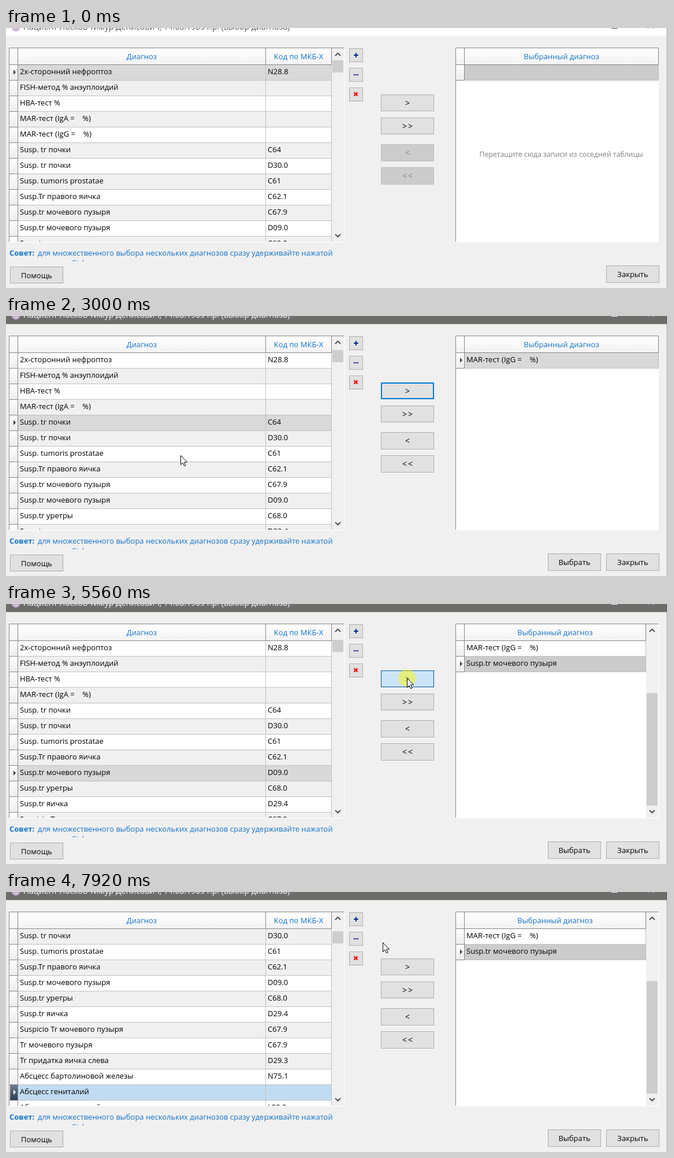
An HTML page with a canvas for the animation above (8 s loop, 1146 by 450 pixels).

```html
<!DOCTYPE html>
<html lang="ru">
<head>
<meta charset="utf-8">
<style>
html, body { margin: 0; width: 100%; height: 100%; overflow: hidden; background: #f0f0f0; }
canvas { display: block; }
</style>
</head>
<body>
<canvas id="stage" width="1146" height="450"></canvas>
<script>
const g = document.getElementById('stage').getContext('2d');
const LOOP = 8000, ROW = 27, TOP = 64;
const BLUE = '#1472c8', LINE = '#c0c0c0', EDGE = '#868686';

const diagnoses = [
  '2x-сторонний нефроптоз|N28.8', 'FISH-метод % анэуплоидий|', 'HBA-тест %|',
  'MAR-тест (IgA =    %)|', 'MAR-тест (IgG =    %)|', 'Susp. tr почки|C64',
  'Susp. tr почки|D30.0', 'Susp. tumoris prostatae|C61', 'Susp.Tr правого яичка|C62.1',
  'Susp.tr мочевого пузыря|C67.9', 'Susp.tr мочевого пузыря|D09.0', 'Susp.tr уретры|C68.0',
  'Susp.tr яичка|D29.4', 'Suspicio Tr мочевого пузыря|C67.9', 'Tr мочевого пузыря|C67.9',
  'Tr придатка яичка слева|D29.3', 'Абсцесс бартолиновой железы|N75.1',
  'Абсцесс гениталий|', 'Абсцесс мошоночный|L08.9'
].map(s => s.split('|'));

// time, x, y of the pointer tip
const path = [
  [360, 560, 452], [840, 416, 171], [1340, 416, 171], [1880, 688, 129], [2120, 688, 129],
  [2840, 312, 235], [2920, 312, 235], [3360, 203, 299], [3840, 203, 299], [4520, 700, 130],
  [4640, 700, 144], [4760, 700, 160], [4880, 698, 146], [5160, 694, 128], [5580, 694, 128],
  [6200, 364, 180], [6360, 364, 180], [7160, 131, 331], [7240, 131, 331], [7360, 127, 348],
  [7540, 127, 348], [7920, 652, 87]
];
const clicks = [[1000, 1200], [1960, 2080], [3720, 3880], [5520, 5600], [7520, 7640]];
const hovers = {
  '>': [[1800, 2300], [4400, 4640], [4920, 5680]],
  '>>': [[4640, 4860]]
};

const clamp = v => Math.max(0, Math.min(1, v));
const within = (t, spans) => spans.some(([a, b]) => t >= a && t < b);

function pointer(t) {
  const i = path.findIndex(p => p[0] > t);
  if (i < 0) return path[path.length - 1].slice(1);
  if (i === 0) return [560, 470];
  const [t0, x0, y0] = path[i - 1], [t1, x1, y1] = path[i];
  const u = (t - t0) / (t1 - t0), e = u * u * (3 - 2 * u);
  return [Math.round(x0 + (x1 - x0) * e), Math.round(y0 + (y1 - y0) * e)];
}

function glow(t, spans = []) {
  return Math.max(0, ...spans.map(([a, b]) =>
    t < b ? clamp((t - a) / 240) : clamp((b - a) / 240) * clamp(1 - (t - b) / 300)));
}

function mix(a, b, k) {
  return `rgb(${a.map((v, i) => Math.round(v + (b[i] - v) * k))})`;
}

function rect(x, y, w, h, color) {
  g.fillStyle = color;
  g.fillRect(x, y, w, h);
}

function shade(x, y, w, h, from, to) {
  const fill = g.createLinearGradient(0, y, 0, y + h);
  fill.addColorStop(0, from);
  fill.addColorStop(1, to);
  rect(x, y, w, h, fill);
}

function text(s, x, y, color = '#000', align = 'left', size = 13, weight = 400) {
  g.font = `${weight} ${size}px "Open Sans", "Noto Sans", sans-serif`;
  g.textAlign = align;
  g.fillStyle = color;
  g.fillText(s, x, y);
}

function poly(points, color) {
  g.beginPath();
  points.forEach(([x, y]) => g.lineTo(x, y));
  g.closePath();
  g.fillStyle = color;
  g.fill();
}

function stroke(points, color, width) {
  g.beginPath();
  points.forEach(([x, y]) => g.lineTo(x, y));
  g.strokeStyle = color;
  g.lineWidth = width;
  g.stroke();
}

function box(x, y, w, h, fill, border, line = 1) {
  rect(x, y, w, h, border);
  rect(x + line, y + line, w - 2 * line, h - 2 * line, fill);
}

function button(label, x, y, h = 29) {
  box(x, y, 92, h, '#e1e1e1', '#adadad');
  text(label, x + 46, y + 20, '#000', 'center');
}

function arrowButton(label, y, h, { off, hot = 0, pressed, focused }) {
  let fill = mix([225, 225, 225], [229, 241, 251], hot);
  let border = mix([173, 173, 173], [0, 120, 215], hot);
  if (off) [fill, border] = ['#cccccc', '#bfbfbf'];
  if (focused) border = '#0078d7';
  if (pressed) [fill, border] = ['#cce4f7', '#005499'];
  box(649, y, 92, h, fill, border, focused && !pressed ? 2 : 1);
  g.letterSpacing = '2px';
  text(label, 696, y + 20, off ? '#838383' : '#000', 'center', 14);
  g.letterSpacing = '0px';
}

function toolButton(y) {
  box(594, y, 24, 24, '#e1e1e1', '#adadad');
}

function scrollbar(x, w, thumbY, thumbH) {
  rect(x, 35, w, 335, '#f0f0f0');
  rect(x + 1, thumbY, w - 2, thumbH, '#cdcdcd');
  const c = x + w / 2;
  stroke([[c - 4.5, 48], [c, 43.5], [c + 4.5, 48]], '#484848', 1.8);
  stroke([[c - 4.5, 357], [c, 361.5], [c + 4.5, 357]], '#484848', 1.8);
}

function header(label, x, w) {
  shade(x, 35, w, 28, '#ffffff', '#f3f3f3');
  rect(x + w, 35, 1, 29, EDGE);
  rect(x, 63, w + 1, 1, EDGE);
  text(label, x + w / 2, 54, BLUE, 'center');
}

function corner(x) {
  shade(x, 35, 14, 28, '#ffffff', '#f3f3f3');
  rect(x, 63, 15, 1, EDGE);
}

function marker(x, y, current, focused) {
  rect(x, y, 1, ROW - 1, '#ffffff');
  shade(x + 1, y, 13, ROW - 1, '#ffffff', '#ececec');
  rect(x, y + ROW - 1, 15, 1, EDGE);
  if (!current) return;
  if (focused) shade(x + 1, y, 13, ROW - 1, '#6d7d90', '#2e4056');
  poly([[x + 7, y + 8], [x + 11, y + 12.5], [x + 7, y + 17]], focused ? '#fff' : '#404040');
}

function rowColor(i, current, focused) {
  const odd = i % 2;
  if (!current) return odd ? '#f0f0f0' : '#ffffff';
  if (focused) return odd ? '#c1dbf2' : '#cce8ff';
  return odd ? '#cbcbcb' : '#d9d9d9';
}

function clipped(x, y, w, h, draw) {
  g.save();
  g.beginPath();
  g.rect(x, y, w, h);
  g.clip();
  draw();
  g.restore();
}

function leftTable(t, focused) {
  const gone = (t >= 2080 ? [4] : []).concat(t >= 5520 ? [9] : []);
  const list = diagnoses.filter((d, i) => !gone.includes(i));
  const wheel = Math.max(0, Math.min(7, Math.floor((t - 6570) / 70)));
  const sel = t < 1000 ? 0 : t < 3720 ? 4 : 8 + wheel;
  const first = Math.max(0, sel - 10);

  rect(5, 34, 581, 337, '#ffffff');
  clipped(6, 35, 558, 335, () => {
    corner(6);
    header('Диагноз', 21, 428);
    header('Код по МКБ-X', 450, 113);
    list.slice(first, first + 12).forEach(([name, code], k) => {
      const y = TOP + k * ROW, i = first + k, current = i === sel;
      rect(21, y, 542, ROW - 1, rowColor(i, current, focused));
      rect(21, y + ROW - 1, 542, 1, LINE);
      marker(6, y, current, focused);
      text(name, 24, y + 16);
      text(code, 453, y + 16);
    });
    rect(449, TOP, 1, 306, LINE);
    rect(563, TOP, 1, 306, LINE);
    rect(20, 35, 1, 335, EDGE);
  });
  scrollbar(564, 21, Math.round(56 + sel * 0.8), 21);
  rect(5, 34, 581, 1, EDGE);
  rect(5, 34, 1, 336, EDGE);
}

function rightTable(t) {
  const chosen = t < 2080 ? [] : t < 5520 ? [4] : [4, 9];
  const two = chosen.length === 2, right = two ? 1107 : 1129;
  rect(778, 34, 352, 337, '#ffffff');
  corner(779);
  header('Выбранный диагноз', 794, right - 794);
  for (let k = 0; k < Math.max(1, chosen.length); k++) {
    const y = TOP + k * ROW, current = k === chosen.length - 1;
    rect(794, y, right - 794, ROW - 1, chosen.length ? rowColor(k, current, false) : '#cccccc');
    rect(794, y + ROW - 1, right - 794, 1, LINE);
    rect(right, y, 1, ROW, LINE);
    marker(779, y, current, false);
    rect(793, y, 1, ROW, EDGE);
    if (chosen.length) text(diagnoses[chosen[k]][0], 797, y + 16);
  }
  rect(793, 35, 1, 29, EDGE);
  if (two) scrollbar(1108, 21, 154, 195);
  if (!chosen.length)
    text('Перетащите сюда записи из соседней таблицы', 961, 223, '#808080', 'center', 12.3);
  rect(778, 34, 352, 1, EDGE);
  rect(778, 34, 1, 336, EDGE);
}

function titleBar(active) {
  const ink = active ? '#ffffff' : '#555555';
  rect(0, 0, 1144, 14, active ? '#6d6d6a' : '#ffffff');
  g.beginPath();
  g.arc(17, -1, 7, 0, 7);
  g.fillStyle = '#cdb9d6';
  g.fill();
  text('Пациент Лосков Тимур Денисович, 14.08.1965 г.р. (выбор диагноза)', 30, 3, ink, 'left', 14);
  rect(1048, 0, 11, 1, ink);
  stroke([[1111, 1], [1114, -2]], ink, 1);
  stroke([[1120, 1], [1117, -2]], ink, 1);
  rect(1144, 0, 1, 450, '#808080');
  rect(1145, 0, 1, 450, '#ffffff');
}

function tools() {
  [35, 69, 103].forEach(toolButton);
  rect(602, 46, 8, 2, '#00308c');
  rect(605, 43, 2, 8, '#00308c');
  [602, 605, 608].forEach(x => rect(x, 80, 2, 2, '#101080'));
  stroke([[602.5, 111.5], [608.5, 117.5]], '#ff0000', 2.4);
  stroke([[608.5, 111.5], [602.5, 117.5]], '#ff0000', 2.4);
}

function cursor(t) {
  const [x, y] = pointer(t);
  if (within(t, clicks)) {
    g.beginPath();
    g.arc(x, y, 15, 0, 7);
    g.fillStyle = 'rgba(248,246,20,.52)';
    g.fill();
  }
  const shape = [[0.5, 0.5], [0.5, 16.5], [4, 13], [6.6, 18.6], [9, 17.5], [6.5, 12], [11.5, 12]]
    .map(([dx, dy]) => [x + dx, y + dy]);
  poly(shape, '#ffffff');
  stroke([...shape, shape[0]], '#000000', 1);
}

function draw(t) {
  const gridFocus = within(t, [[1000, 2080], [3720, 5520], [7520, LOOP]]);
  const moveFocus = within(t, [[2080, 3720], [5520, 7520]]);
  rect(0, 0, 1146, 450, '#f0f0f0');
  titleBar(t >= 1000);
  leftTable(t, gridFocus);
  rightTable(t);
  tools();

  arrowButton('>', 115, 29, {
    hot: glow(t, hovers['>']),
    pressed: within(t, [[1960, 2120], [5520, 5600]]),
    focused: moveFocus
  });
  arrowButton('>>', 155, 29, { hot: glow(t, hovers['>>']) });
  arrowButton('<', 201, 30, { off: t < 2120 });
  arrowButton('<<', 241, 30, { off: t < 2120 });

  clipped(0, 380, 640, 24, () => {
    text('Совет:', 6, 394, BLUE, 'left', 13, 700);
    text('для множественного выбора нескольких диагнозов сразу удерживайте нажатой', 55, 394, BLUE);
    text('клавишу Ctrl', 55, 411, BLUE);
  });
  button('Помощь', 7, 413);
  if (t >= 2080) button('Выбрать', 938, 411, 30);
  button('Закрыть', 1039, 411, 30);
  cursor(t);
}

function tick() {
  draw(performance.now() % LOOP);
  requestAnimationFrame(tick);
}
tick();
</script>
</body>
</html>
```
